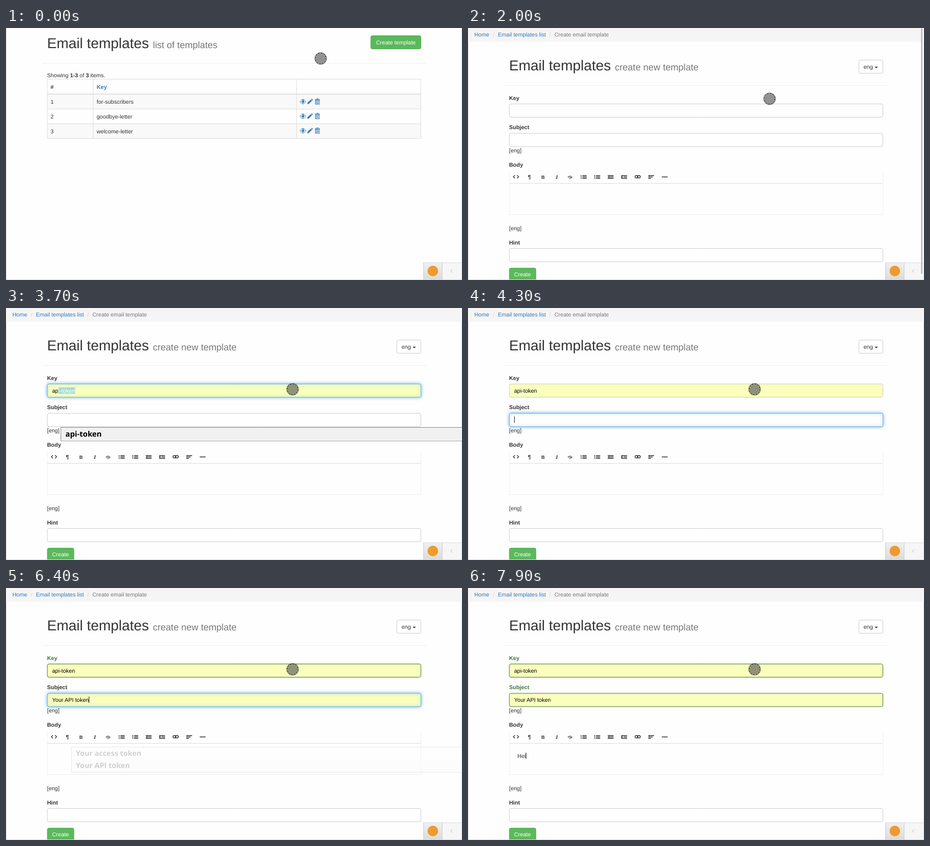
These frames come from a looping animation (860 by 476 pixels, 8000 ms). An HTML page with a canvas:

```html
<!DOCTYPE html>
<html lang="en">
<head>
<meta charset="utf-8">
<title>Email templates</title>
<style>
  html, body { margin: 0; width: 100%; height: 100%; overflow: hidden; background: #fefefe; }
  canvas { display: block; }
</style>
</head>
<body>
<canvas id="stage" width="860" height="476"></canvas>
<script>
const W = 860, H = 476, LOOP = 8000, STEP = 100;
const ctx = document.getElementById('stage').getContext('2d');
const SANS = '"Liberation Sans", Arial, sans-serif';
const INK = '#333', LINK = '#337ab7', GREEN = '#3c763d', YELLOW = '#faffbd', PAPER = '#fefefe';

const clamp = v => Math.max(0, Math.min(1, v));
const smooth = p => p * p * (3 - 2 * p);
const smoother = p => p * p * p * (p * (6 * p - 15) + 10);
const mix = (a, b, p) => a + (b - a) * p;
const ramp = (t, start) => clamp((t - start + STEP) / (2 * STEP));
const typed = (t, times, word) => word.slice(0, times.filter(s => t >= s).length);

// Returns the x position after the text.
function text(str, x, y, { size = 10.5, color = INK, bold = false, family = SANS } = {}) {
  ctx.font = `${bold ? 'bold ' : ''}${size}px ${family}`;
  ctx.fillStyle = color;
  ctx.fillText(str, x, y);
  return x + ctx.measureText(str).width;
}

function rect(x, y, w, h, color) {
  ctx.fillStyle = color;
  ctx.fillRect(x, y, w, h);
}

function box(x, y, w, h, r, fill, stroke) {
  ctx.beginPath();
  ctx.roundRect(x, y, w, h, r);
  if (fill) { ctx.fillStyle = fill; ctx.fill(); }
  if (stroke) { ctx.strokeStyle = stroke; ctx.lineWidth = 1; ctx.stroke(); }
}

function path(points, width = 1, color = INK) {
  ctx.beginPath();
  points.forEach(([x, y], i) => i ? ctx.lineTo(x, y) : ctx.moveTo(x, y));
  ctx.lineWidth = width;
  ctx.strokeStyle = color;
  ctx.stroke();
}

function polygon(points, fill) {
  ctx.beginPath();
  points.forEach(([x, y]) => ctx.lineTo(x, y));
  ctx.closePath();
  ctx.fillStyle = fill;
  ctx.fill();
}

function disc(x, y, r, fill) {
  ctx.beginPath();
  ctx.arc(x, y, r, 0, 2 * Math.PI);
  ctx.fillStyle = fill;
  ctx.fill();
}

function heading(y, small) {
  text('Email templates', 77.5, y, { size: 27 });
  text(small, 277, y, { size: 17.55, color: '#777' });
  rect(68, y + 28, 725, 1, '#eee');
}

function rowIcons(y) {
  // eye
  ctx.beginPath();
  ctx.moveTo(554, y);
  ctx.quadraticCurveTo(560, y - 9.5, 566, y);
  ctx.quadraticCurveTo(560, y + 9.5, 554, y);
  ctx.fillStyle = LINK;
  ctx.fill();
  ctx.beginPath();
  ctx.ellipse(560, y, 4.6, 3.4, 0, 0, 2 * Math.PI);
  ctx.fillStyle = '#fff';
  ctx.fill();
  disc(560, y - 0.3, 2.7, LINK);
  disc(559.2, y - 1.2, 0.8, '#fff');
  // pencil
  polygon([[568, y + 5], [569, y + 1.8], [574.7, y - 3.8], [577, y - 1.5], [571.2, y + 4.2]], LINK);
  polygon([[575.4, y - 4.4], [576.6, y - 5.5], [579, y - 3.2], [577.8, y - 2.1]], LINK);
  // trash
  rect(582.5, y - 4.5, 9.5, 1.2, LINK);
  rect(585.5, y - 6, 3.5, 1, LINK);
  ctx.strokeStyle = LINK;
  ctx.lineWidth = 1;
  ctx.strokeRect(583.5, y - 2.5, 7.5, 7.5);
  for (const x of [585.2, 587, 588.8]) rect(x - 0.4, y - 1.5, 0.9, 5.5, LINK);
}

function listPage(t) {
  heading(38, 'list of templates');
  const [fill, edge] = t >= 1200 && t < 1400 ? ['#398439', '#255625']
    : t >= 1100 ? ['#449d44', '#398439'] : ['#5cb85c', '#4cae4c'];
  box(688, 14.5, 94.5, 25, 3, fill, edge);
  text('Create template', 698, 31, { color: '#fff' });

  let x = 77.5;
  [['Showing '], ['1-3', true], [' of '], ['3', true], [' items.']]
    .forEach(([s, bold]) => { x = text(s, x, 93, { bold }); });

  rect(78, 125, 705, 28, '#f9f9f9');
  rect(78, 181, 705, 28, '#f9f9f9');
  for (const y of [96, 152.5, 180.5, 208]) rect(77.5, y, 705, 1, '#ddd');
  rect(77.5, 124, 705, 1.6, '#ddd');
  for (const cx of [77.5, 164, 547.5, 782]) rect(cx, 96, 1, 113, '#ddd');
  text('#', 84, 115, { bold: true });
  text('Key', 171, 115, { bold: true, color: LINK });
  ['for-subscribers', 'goodbye-letter', 'welcome-letter'].forEach((key, i) => {
    text(String(i + 1), 84, 143 + 28 * i);
    text(key, 171, 143 + 28 * i);
    rowIcons(139 + 27.5 * i);
  });
}

function field(y, { fill = '#fff', focus = 0, valid = false } = {}) {
  box(78, y, 704.5, 25, 3, fill, valid ? GREEN : '#ccc');
  if (!focus) return;
  ctx.save();
  ctx.globalAlpha = focus;
  ctx.shadowColor = 'rgba(102,175,233,.9)';
  ctx.shadowBlur = 6;
  box(78, y, 704.5, 25, 3, fill, '#66afe9');
  ctx.restore();
}

const caret = (x, y) => rect(Math.round(x), y, 1, 12, '#222');

// Typed part in plain ink, suggested remainder as a selection.
function suggestion(start, rest, y) {
  const x = text(start, 87, y, { color: '#000' });
  rect(x, y - 10, ctx.measureText(rest).width, 12, '#a6dcd6');
  text(rest, x, y, { color: '#fff' });
}

function toolbar() {
  const y = 281;
  const lines = (x, widths, dx = 0) =>
    widths.forEach((w, i) => rect(x + dx, y - 3 + i * 2.7, w, 1.5, INK));
  path([[88.5, y - 3], [85.5, y], [88.5, y + 3]], 1.3);
  path([[92.5, y - 3], [95.5, y], [92.5, y + 3]], 1.3);
  text('¶', 113, y + 4, { bold: true });
  text('B', 138.3, y + 3.5, { bold: true, size: 9 });
  ctx.save();
  ctx.transform(1, 0, -0.2, 1, 57, 0);
  text('I', 165, y + 3.5, { bold: true, size: 10, family: '"Liberation Serif", serif' });
  ctx.restore();
  text('S', 189.5, y + 3.5, { size: 9 });
  rect(188, y, 9, 1, INK);
  for (const x of [212.5, 238]) {
    lines(x, [1.8, 1.8, 1.8]);
    lines(x, [8, 8, 8], 3.3);
  }
  for (const [x, tip] of [[263.5, -1], [289, 1]]) {
    rect(x, y - 3, 11, 1.5, INK);
    rect(x, y + 2.4, 11, 1.5, INK);
    rect(x + 4.5, y - 0.3, 6.5, 1.5, INK);
    polygon([[x + 1.8 - tip * 1.8, y - 1.8], [x + 1.8 + tip * 1.8, y + 0.4], [x + 1.8 - tip * 1.8, y + 2.6]], INK);
  }
  ctx.strokeStyle = INK;
  ctx.lineWidth = 1.4;
  for (const x of [315, 319.5]) {
    ctx.beginPath();
    ctx.roundRect(x, y - 2.3, 5.5, 4.6, 2.3);
    ctx.stroke();
  }
  lines(340, [11, 8, 5]);
  rect(365.5, y - 0.4, 11, 1.5, INK);
}

function popup(t, { on, off, y, rows, active }) {
  if (t < on || t >= off + 2 * STEP) return;
  const closing = Math.floor((t - off) / STEP);
  const [alpha, scale] = closing >= 0 ? [[0.6, 0.98], [0.18, 0.96]][closing]
    : t < on + STEP ? [0.5, 0.97] : [1, 1];
  const h = rows.length * 24 + 1.5, midY = y + h / 2;
  ctx.save();
  ctx.globalAlpha = alpha;
  ctx.translate(603, midY);
  ctx.scale(scale, scale);
  ctx.translate(-603, -midY);
  box(103.5, y, 1000, h, 0, '#fff', '#888');
  rows.forEach((row, i) => {
    if (i === active) rect(104, y + 0.5 + i * 24, 999, 24.5, '#f1f1f1');
    text(row, 112, y + 17.5 + i * 24,
      { size: 14.4, bold: true, color: '#000', family: '"Open Sans", sans-serif' });
  });
  ctx.restore();
}

function keyField(t) {
  const valid = t >= 4400;
  text('Key', 77.5, 136, { bold: true, color: valid ? GREEN : INK });
  field(143.5, { fill: t >= 3600 ? YELLOW : '#fff', focus: ramp(t, 2600) - ramp(t, 4200), valid });
  if (t >= 3600 && t < 3900) return suggestion('ap', 'i-token', 160);
  const value = t >= 3900 ? 'api-token' : typed(t, [3000, 3100], 'ap');
  const end = text(value, 87, 160, { color: t >= 3900 ? '#000' : '#555' });
  if (t >= 2600 && t < 4200) caret(end, 150);
}

function subjectField(t) {
  const valid = t >= 7000;
  text('Subject', 77.5, 191, { bold: true, color: valid ? GREEN : INK });
  field(199, { fill: t >= 6000 ? YELLOW : '#fff', focus: ramp(t, 4200) - ramp(t, 6700), valid });
  if (t >= 6000 && t < 6300) return suggestion('You', t < 6100 ? 'r access token' : 'r API token', 215);
  const chosen = t >= 6300;
  const value = chosen ? 'Your API token' : typed(t, [5000, 5300, 5500], 'You');
  const end = text(value, 87, 215, { color: chosen ? '#000' : '#555' });
  if (t >= 4300 && t < 6700) caret(end - 0.5, 205);
}

function formPage(t) {
  rect(0, 0, W, 26, '#f5f5f5');
  text('Home', 12, 16, { color: LINK });
  text('/', 47, 16, { color: '#ccc' });
  text('Email templates list', 56.5, 16, { color: LINK });
  text('/', 153.5, 16, { color: '#ccc' });
  text('Create email template', 163, 16, { color: '#777' });
  heading(80, 'create new template');
  box(737, 60.5, 45.5, 25, 3, '#fff', '#ccc');
  text('eng', 746, 77);
  polygon([[767, 73], [773, 73], [770, 76]], INK);

  keyField(t);
  subjectField(t);
  text('[eng]', 77.5, 235);

  text('Body', 77.5, 262, { bold: true });
  rect(77.5, 270, 1, 83, '#f0f0f0');
  rect(782, 270, 1, 83, '#f0f0f0');
  rect(77.5, 352, 705, 1, '#eee');
  rect(77.5, 293, 705, 1, '#ddd');
  toolbar();
  const end = text(typed(t, [7500, 7700, 7900], 'Hel'), 93.3, 321);
  if (t >= 6800) caret(end, 311);

  text('[eng]', 77.5, 382);
  text('Hint', 77.5, 409, { bold: true });
  field(416.5);
  box(78, 453.5, 50, 26, 3, '#5cb85c', '#4cae4c');
  text('Create', 87, 469, { color: '#fff' });

  popup(t, { on: 3000, off: 3900, y: 225.5,
    rows: t < 3100 ? ['api-token', ''] : ['api-token'], active: t >= 3600 ? 0 : -1 });
  popup(t, { on: 5000, off: 6300, y: 299.5,
    rows: ['Your access token', 'Your API token'], active: t >= 6100 ? 1 : t >= 6000 ? 0 : -1 });
}

function debugBadge() {
  const shade = ctx.createLinearGradient(0, 443, 0, 475);
  shade.addColorStop(0, '#f0f0f0');
  shade.addColorStop(1, '#dcdcdc');
  rect(787, 443, 72, 32, '#f6f6f6');
  rect(787, 443, 36, 32, shade);
  rect(787, 443, 72, 1, '#ddd');
  rect(787, 443, 1, 32, '#ccc');
  rect(822, 443, 1, 32, '#ccc');
  disc(805, 459, 10, '#ee9a2e');
  path([[841.5, 456], [838.5, 459], [841.5, 462]], 1, '#bbb');
}

function pointer(t) {
  if (t >= 1100 && t < 1400) {
    const arrow = [[713.5, 29.5], [713.5, 46], [717.2, 42.6], [719.7, 48.8], [722.6, 47.6], [720, 41.6], [725, 41.6]];
    polygon(arrow, '#fff');
    path([...arrow, arrow[0], arrow[1]], 1.3, '#000');
    return;
  }
  const there = smooth(clamp((t - 200) / 600));
  const back = smoother(clamp((t - 1300) / 1000));
  const x = mix(mix(593.5, 714, there), 540.5, back);
  const y = mix(mix(57.5, 32, there), 153.5, back);
  disc(x, y, 11.5, 'rgba(60,60,60,.56)');
  ctx.strokeStyle = 'rgba(60,60,60,.5)';
  ctx.lineWidth = 1;
  ctx.beginPath();
  ctx.arc(x, y, 11, 0, 2 * Math.PI);
  ctx.stroke();
  ctx.beginPath();
  ctx.arc(x, y, 9.9, 0, 2 * Math.PI);
  ctx.strokeStyle = 'rgba(255,255,255,.35)';
  ctx.stroke();
  ctx.setLineDash([2.2, 3]);
  ctx.strokeStyle = '#111';
  ctx.stroke();
  ctx.setLineDash([]);
}

function draw() {
  const t = Math.floor(performance.now() % LOOP / STEP) * STEP;
  ctx.textRendering = 'geometricPrecision';
  rect(0, 0, W, H, PAPER);
  const onForm = t >= 1500;
  rect(0, 0, 1, H, '#ddd');
  rect(859, 0, 1, H, '#ddd');
  (onForm ? formPage : listPage)(t);
  debugBadge();
  if (onForm && t < 2300) rect(854.5, 1, 2.5, 463, '#b8b8b8');
  rect(0, 475, W, 1, '#d8d8d8');
  pointer(t);
  requestAnimationFrame(draw);
}
draw();
</script>
</body>
</html>
```
